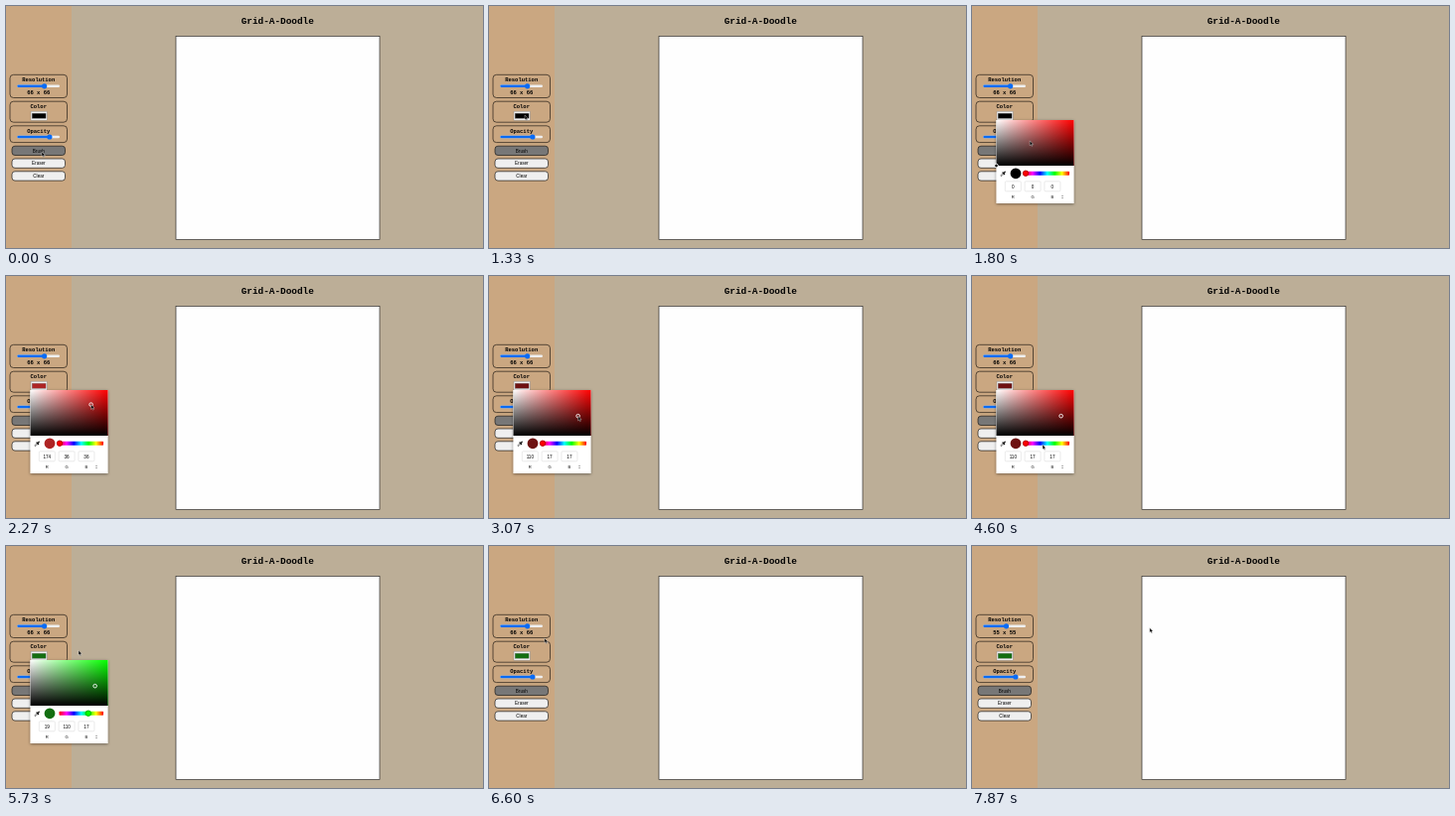
An HTML page for the animation above (8 s loop, 480x244 px).

```html
<!DOCTYPE html>
<html lang="en">
<head>
<meta charset="utf-8">
<title>Sketch pad</title>
<style>
  html, body { margin: 0; width: 100%; height: 100%; overflow: hidden; background: #bcae97; }
  svg { display: block; width: 480px; height: 244px; }
  text { text-anchor: middle; }
  .mono { font: bold 5.5px "Liberation Mono", "Courier New", monospace; }
  .title { font-size: 9.4px; }
  .ui { font: 4.6px "Liberation Sans", Arial, sans-serif; }
  .small { font-size: 4.1px; }
  .panel { fill: none; stroke: #17120d; stroke-width: .65; }
  .button { fill: #efefef; stroke: #111; stroke-width: .65; }
  .active { fill: #777; }
  .field { fill: #fff; stroke: #d4d4d4; stroke-width: .5; }
  .blue { fill: #0a6cf5; }
  #spot { stroke: #fff; stroke-width: .9; }
  #knob { stroke-width: .9; }
</style>
</head>
<body>
<svg viewBox="0 0 480 244">
  <defs>
    <linearGradient id="tint">
      <stop stop-color="#fff"/>
      <stop id="pure" offset="1"/>
    </linearGradient>
    <linearGradient id="shade" x2="0" y2="1">
      <stop stop-opacity="0"/>
      <stop offset="1"/>
    </linearGradient>
    <linearGradient id="spectrum"></linearGradient>
    <filter id="shadow" x="-10%" y="-10%" width="120%" height="120%">
      <feDropShadow dx="0" dy=".8" stdDeviation="1.4" flood-opacity=".45"/>
    </filter>
  </defs>
  <rect width="480" height="244" fill="#bcae97"/>
  <rect width="66" height="244" fill="#caa781"/>
  <text class="mono title" x="273.3" y="18">Grid-A-Doodle</text>
  <rect x="171" y="30.5" width="205" height="205" fill="#fefefe" stroke="#222" stroke-width=".65"/>
  <g id="side"></g>
  <g id="picker">
    <rect x="24.5" y="115" width="78" height="84" fill="#fff" filter="url(#shadow)"/>
    <rect x="24.5" y="115" width="78" height="46" fill="url(#tint)"/>
    <rect x="24.5" y="115" width="78" height="46" fill="url(#shade)"/>
    <circle id="spot" r="1.8"/>
    <g transform="translate(31.5 169) rotate(45)" stroke="#111" stroke-linecap="round">
      <path d="M-.6 0V2.6L0 3.4L.6 2.6V0" fill="#fff" stroke-width=".5"/>
      <path d="M-1.1 -.4H1.1M0 -.8V-2.4" stroke-width="1.3"/>
    </g>
    <circle id="preview" cx="44" cy="168.8" r="5.4"/>
    <rect x="53.5" y="166.8" width="44.5" height="3.9" rx=".8" fill="url(#spectrum)"/>
    <circle id="knob" cy="168.7" r="2.7"/>
    <g id="fields"></g>
    <path d="M90.3 192L91 191.2L91.7 192M90.3 193.2L91 194L91.7 193.2" fill="none" stroke="#333" stroke-width=".5"/>
  </g>
  <path id="cursor" d="M0 0V4.8L1.1 3.8L1.9 5.5L2.7 5.1L1.9 3.5H3.4Z" stroke="#fff" stroke-width=".35"/>
</svg>
<script>
const LOOP = 8000, FPS = 15, GLIDE = 400;
const OPEN = 1460, CLOSE = 6390;
const $ = id => document.getElementById(id);
const set = (id, attrs) => {
  for (const name in attrs) $(id).setAttribute(name, attrs[name]);
};
const clamp = (v, lo, hi) => Math.max(lo, Math.min(hi, v));

const TRACK_X = 11.3, TRACK_W = 42.7, THUMB_R = 2.6;
const TRAVEL = TRACK_W - 2 * THUMB_R;
const thumbX = value => TRACK_X + THUMB_R + value / 100 * TRAVEL;
const valueAt = x => Math.round((x - TRACK_X - THUMB_R) / TRAVEL * 100);

const panel = (y, h) => `<rect class="panel" x="4" y="${y}" width="57.5" height="${h}" rx="3.5"/>`;
const label = (text, y, id = "") => `<text class="mono" id="${id}" x="32.7" y="${y}">${text}</text>`;
const bar = (attrs, y, width) =>
  `<rect ${attrs} x="${TRACK_X}" y="${y - 1.2}" width="${width}" height="2.4" rx="1.2"/>`;
const slider = (id, y, value) =>
  bar('fill="#efefef"', y, TRACK_W) +
  bar(`id="${id}Fill" class="blue"`, y, thumbX(value) - TRACK_X) +
  `<circle id="${id}Thumb" class="blue" cx="${thumbX(value)}" cy="${y}" r="${THUMB_R}"/>`;
const button = (text, i) => {
  const y = 141.2 + i * 12.8;
  return `<rect class="button ${i ? "" : "active"}" x="6" y="${y}" width="53.5" height="9.3" rx="3"/>
    <text class="ui" x="32.8" y="${y + 6.3}">${text}</text>`;
};

$("side").innerHTML =
  panel(69.3, 23.2) + label("Resolution", 76) + slider("size", 80.8, 66) + label("", 89, "sizeText") +
  panel(96.2, 21) + label("Color", 103) +
  `<rect x="25" y="106.2" width="16.3" height="9" fill="#efefef" stroke="#767676" stroke-width=".33"/>
   <rect id="swatch" x="26.2" y="108.2" width="13.9" height="5.1" stroke="#777" stroke-width=".33"/>` +
  panel(120.8, 16.8) + label("Opacity", 127.8) + slider("alpha", 132, 80) +
  ["Brush", "Eraser", "Clear"].map(button).join("");

const CHANNELS = ["R", "G", "B"];
$("fields").innerHTML = CHANNELS.map((name, i) => {
  const x = 41.3 + i * 19.8;
  return `<rect class="field" x="${x - 8}" y="176.8" width="16" height="10" rx="1"/>
    <text class="ui" id="val${name}" x="${x}" y="183.6"></text>
    <text class="ui small" x="${x}" y="193.9">${name}</text>`;
}).join("");

function rgb(h, s, v) {
  return [5, 3, 1].map(n => {
    const k = (n + h / 60) % 6;
    return Math.round(255 * v * (1 - s * clamp(Math.min(k, 4 - k), 0, 1)));
  });
}
const css = (h, s, v) => `rgb(${rgb(h, s, v).join(",")})`;

for (let i = 0; i <= 6; i++) {
  $("spectrum").innerHTML += `<stop offset="${i / 6}" stop-color="${css(360 - i * 60, 1, 1)}"/>`;
}

// Stops of the pointer; each is reached by a glide of fixed length.
const STOPS = [
  { at: 0, x: 36, y: 147 },
  { at: 667, x: 36, y: 132 },
  { at: 1333, x: 36, y: 110 },
  { at: 1867, x: 60, y: 138 },
  { at: 2267, x: 85.57, y: 129.6 },
  { at: 2733, x: 89.6, y: 141.16 },
  { at: 3667, x: 72, y: 172 },
  { at: 4600, x: 71, y: 170 },
  { at: 5133, x: 82.8, y: 169 },
  { at: 5733, x: 73, y: 105.3 },
  { at: 6800, x: thumbX(66), y: 80.5 },
  { at: 7267, x: thumbX(55), y: 80.5 },
  { at: 7867, x: 178.8, y: 82.5 }
];
// Spans during which the button is held.
const PAINT = [1867, 2733], SPIN = [4660, 5133], RESIZE = [6800, 7267];

function pointer(t) {
  return STOPS.reduce((from, to) => {
    const p = clamp((t - to.at) / GLIDE + 1, 0, 1);
    const e = p * p * (3 - 2 * p);
    return { x: from.x + (to.x - from.x) * e, y: from.y + (to.y - from.y) * e };
  });
}
const held = (t, span) => pointer(clamp(t, ...span));

function draw(time) {
  const t = Math.floor(time % LOOP * FPS / 1000 + .06) * 1000 / FPS;
  const { x, y } = pointer(t);
  const tone = held(t, PAINT), painted = t >= PAINT[0] - 1;
  const s = painted ? (tone.x - 24.5) / 77 : 0;
  const v = painted ? 1 - (tone.y - 115) / 46 : 0;
  const hue = t < SPIN[0] ? 360 : 360 * (1 - (held(t, SPIN).x - 54) / 43);
  const size = valueAt(held(t, RESIZE).x);
  const fill = css(hue, s, v), pure = css(hue, 1, 1);

  set("cursor", { transform: `translate(${x} ${y})` });
  set("picker", { visibility: t > OPEN && t < CLOSE ? "visible" : "hidden" });
  set("spot", { cx: 24.5 + 77 * s, cy: 115 + 46 * (1 - v), fill });
  set("knob", { cx: 54 + 43 * (1 - hue / 360), fill: pure, stroke: css(hue, 1, .7) });
  set("pure", { "stop-color": pure });
  set("swatch", { fill });
  set("preview", { fill });
  set("sizeThumb", { cx: thumbX(size) });
  set("sizeFill", { width: thumbX(size) - TRACK_X });
  $("sizeText").textContent = `${size} x ${size}`;
  rgb(hue, s, v).forEach((c, i) => $("val" + CHANNELS[i]).textContent = c);
}

const start = performance.now();
function tick() {
  draw(performance.now() - start);
  requestAnimationFrame(tick);
}
tick();
</script>
</body>
</html>
```
